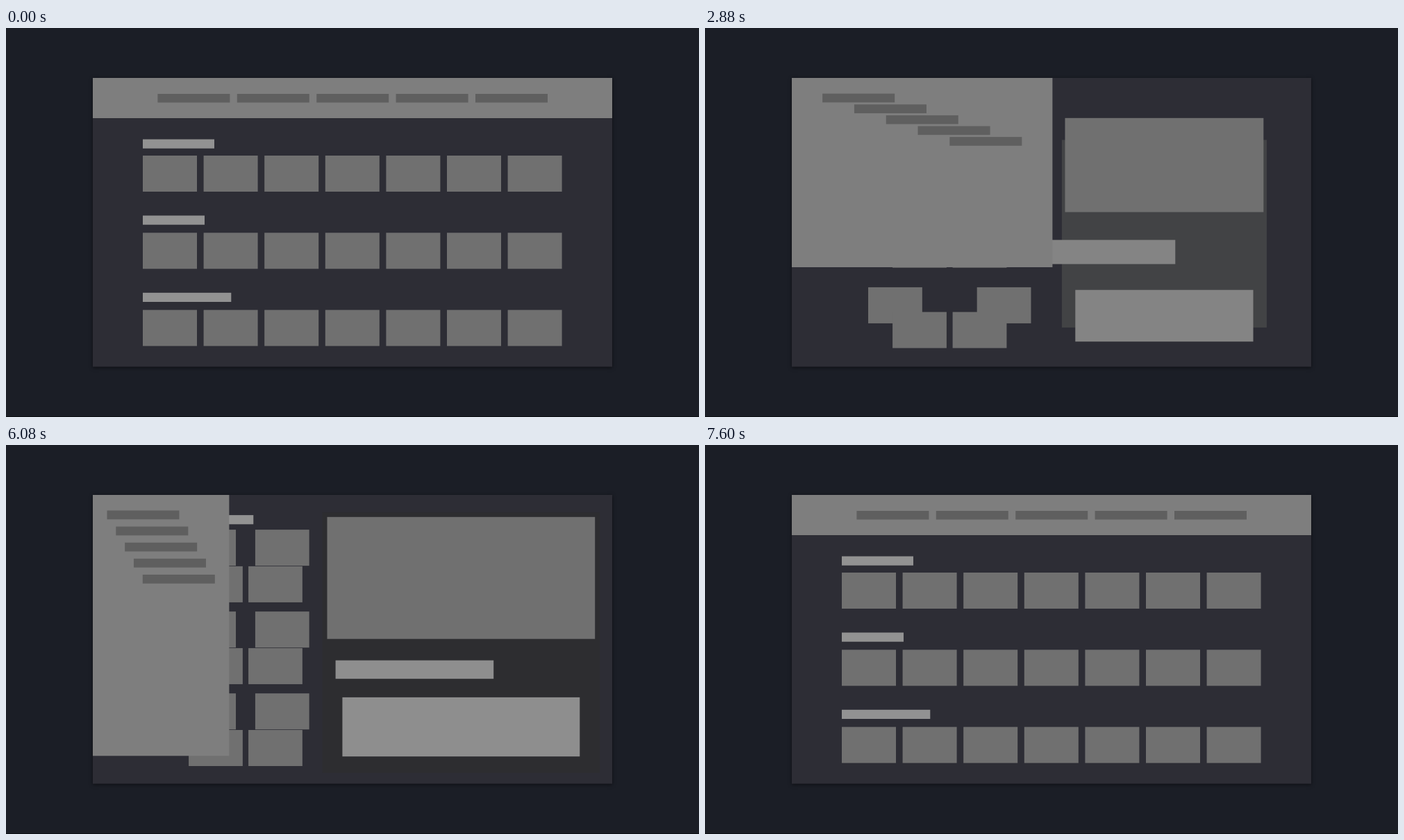
An HTML page with a canvas that plays this animation: 998x561 px, repeating every 8240 ms.

```html
<!DOCTYPE html>
<html lang="en">
<head>
<meta charset="utf-8">
<title>Layout morph</title>
<style>
  html, body { margin: 0; width: 100%; height: 100%; overflow: hidden; background: #1b1e26; }
  canvas { display: block; }
</style>
</head>
<body>
<canvas id="stage" width="998" height="561"></canvas>
<script>
const ctx = document.getElementById('stage').getContext('2d');

const LOOP = 8240, TICK = 80;
const START = 1808, MORPH = 1920, FADE = 640, TURN = 4680;

const CARD = [112, 112, 112], LABEL = [146, 146, 146], BAR = [95, 95, 95];
const NAV = [126, 126, 126], PANEL = [36, 37, 40];

// Rectangles are [x, y, width, height].
const card = (row, col) => [197 + 87.6 * col, 184 + 111.3 * row, 78, 52];
const tile = (row, col) => [260.4 + 85.8 * col, 114.3 + 59.45 * row, 77.7, 52];
const part = (from, to, c1, c2 = c1) => ({ from, to, c1, c2 });

const nav = part([125, 72, 748, 58], [125, 72, 126.7, 416.5], NAV);
const bars = [0, 1, 2, 3, 4].map(i =>
  part([218.4 + 114.4 * i, 95, 104, 12.5], [136.3, 94.4 + 26.05 * i, 104, 12.8], BAR));

const heading = part([197, 160.5, 103, 13.2], [260.4, 93.6, 103, 13.2], LABEL);

// The outer cards of each row join the upper pair, the inner ones the lower pair.
const tiles = [];
for (let row = 0; row < 3; row++) {
  for (let col = 0; col < 4; col++) {
    const lower = col === 1 || col === 2 ? 1 : 0;
    tiles.push(part(card(row, col), tile(2 * row + lower, col < 2 ? 0 : 1), CARD));
  }
}

const panel = part(card(1, 5), [433, 72, 440, 416.5], CARD, PANEL);
const details = [
  part(card(0, 5), [440.7, 93.7, 424.6, 191.5], CARD),
  part(card(1, 4), [465.4, 312.5, 246.5, 23.4], CARD, LABEL),
  part(card(2, 5), [465.4, 358.5, 375.2, 89.5], CARD, LABEL)
];

const fading = [
  [[197, 270.5, 89, 13.2], LABEL],
  [[197, 381.8, 127.3, 13.2], LABEL],
  ...[[0, 4], [0, 6], [1, 6], [2, 4], [2, 6]].map(([row, col]) => [card(row, col), CARD])
];

const clamp = v => Math.min(1, Math.max(0, v));
const mix = (a, b, p) => a.map((v, i) => v + (b[i] - v) * p);

// cubic-bezier(.42, 0, .58, 1), solved by bisection
function ease(t) {
  let lo = 0, hi = 1, u = 0.5;
  for (let i = 0; i < 24; i++) {
    u = (lo + hi) / 2;
    const x = 1.26 * u * (1 - u) ** 2 + 1.74 * u * u * (1 - u) + u ** 3;
    if (x < t) lo = u; else hi = u;
  }
  return t <= 0 ? 0 : t >= 1 ? 1 : u * u * (3 - 2 * u);
}

function fill(rect, color) {
  ctx.fillStyle = `rgb(${color.map(Math.round).join(',')})`;
  ctx.fillRect(...rect);
}

function drawWindow() {
  fill([0, 0, 998, 561], [27, 30, 38]);
  fill([0, 560, 998, 1], [13, 15, 19]);
  ctx.save();
  ctx.shadowColor = 'rgba(0,0,0,.5)';
  ctx.shadowBlur = 5;
  ctx.shadowOffsetY = 1;
  fill([125, 72, 748, 416.5], [45, 45, 53]);
  ctx.restore();
}

function draw(time) {
  const elapsed = (time < TURN ? time : 2 * TURN - time) - START;
  const p = ease(clamp(elapsed / MORPH));
  const show = s => fill(mix(s.from, s.to, p), mix(s.c1, s.c2, p));

  drawWindow();

  ctx.globalAlpha = 1 - ease(clamp(elapsed / FADE));
  fading.forEach(([rect, color]) => fill(rect, color));
  ctx.globalAlpha = 1;

  show(heading);
  tiles.forEach(show);
  // The panel starts in front of its contents and ends behind them.
  (p < 0.5 ? [...details, panel] : [panel, ...details]).forEach(show);
  show(nav);
  bars.forEach(show);
}

function frame() {
  const time = performance.now() % LOOP;
  draw(Math.floor(time / TICK) * TICK);
  requestAnimationFrame(frame);
}
frame();
</script>
</body>
</html>
```
